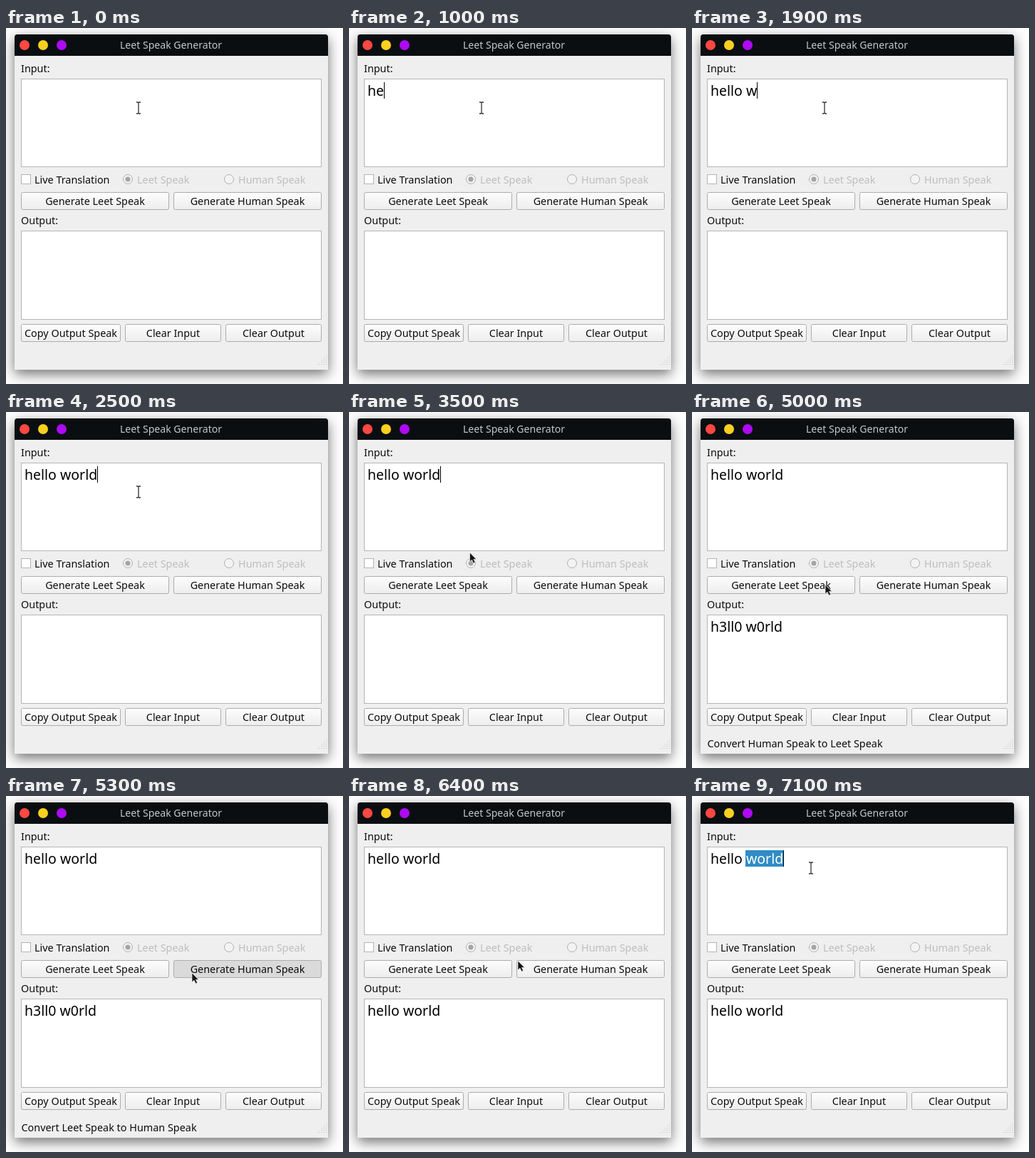
These frames come from a looping animation (473x499 px, 8000 ms). An HTML page:

```html
<!DOCTYPE html>
<html lang="en">
<head>
<meta charset="utf-8">
<title>Leet Speak Generator</title>
<style>
  html, body { margin: 0; width: 100%; height: 100%; overflow: hidden; background: #fdfdfd; }
  svg { display: block; width: 473px; height: 499px; }
  text { font: 14.4px "Noto Sans", "Open Sans", sans-serif; white-space: pre; fill: #0c0c0c; }
  .big { font-size: 19.5px; fill: #000; }
  .off { fill: #bebebe; }
  .mid { text-anchor: middle; }
  .field { fill: #fff; stroke: #b5b5b5; }
  .button { fill: url(#face); stroke: #adadad; }
  .button.down { fill: #dadada; }
</style>
</head>
<body>
<svg id="stage" viewBox="0 0 473 499" xmlns="http://www.w3.org/2000/svg">
  <defs>
    <linearGradient id="face" x2="0" y2="1">
      <stop stop-color="#fdfdfd"/><stop offset="1" stop-color="#ededed"/>
    </linearGradient>
    <filter id="blur" x="-20%" y="-20%" width="140%" height="140%">
      <feGaussianBlur stdDeviation="9"/>
    </filter>
  </defs>
  <rect width="473" height="499" fill="#fdfdfd"/>
  <rect x="12" y="15" width="440" height="470" fill="#000" opacity=".55" filter="url(#blur)"/>
  <path d="M12 479V13q0-4 4-4H448q4 0 4 4V479z" fill="#efefef"/>
  <path d="M12 39V13q0-4 4-4H448q4 0 4 4V39z" fill="#0a0e11"/>
  <circle cx="26" cy="24" r="7" fill="#ff4843"/>
  <circle cx="52" cy="24" r="7" fill="#fdd01f"/>
  <circle cx="78" cy="24" r="7" fill="#ae0af5"/>
  <text class="mid" x="231.5" y="28.5" style="font-size:14.1px;fill:#c3c7ca">Leet Speak Generator</text>
  <text x="21" y="62">Input:</text>
  <rect class="field" x="21.5" y="71.5" width="421" height="123"/>
  <rect class="field" x="21.5" y="205.5" width="13" height="13"/>
  <text x="40" y="218">Live Translation</text>
  <g fill="#f3f3f3" stroke="#b0b0b0">
    <circle cx="171" cy="212" r="6.5"/>
    <circle cx="313" cy="212" r="6.5"/>
  </g>
  <circle cx="171" cy="212" r="3.5" fill="#a5a5a5"/>
  <text class="off" x="184" y="218">Leet Speak</text>
  <text class="off" x="326" y="218">Human Speak</text>
  <text x="21" y="275">Output:</text>
  <rect class="field" x="21.5" y="284.5" width="421" height="124"/>
  <g id="buttons"></g>
  <g id="grip" fill="#bdbdbd"></g>
  <rect id="mark" y="76" height="23" fill="#308cc6"/>
  <text class="big" x="26" y="95"><tspan id="head"></tspan><tspan id="tail"></tspan></text>
  <rect id="caret" y="76" width="1" height="23" fill="#000"/>
  <text class="big" id="output" x="26" y="308"></text>
  <text id="status" x="21.5" y="470"></text>
  <g id="beam" fill="none">
    <path d="M-3-8H-1L0-7 1-8H3M0-7V7M-3 8H-1L0 7 1 8H3" stroke="#fff" stroke-width="2.6" opacity=".7"/>
    <path d="M-3-8H-1L0-7 1-8H3M0-7V7M-3 8H-1L0 7 1 8H3" stroke="#333" stroke-width="1.3"/>
  </g>
  <path id="arrow" d="M0 0V13L3 10.3 5.2 15 7.6 13.8 5.5 9.4H9.3z" fill="#151515" stroke="#eee" stroke-width=".7"/>
</svg>
<script>
const $ = id => document.getElementById(id);
const NS = "http://www.w3.org/2000/svg";
const LOOP = 8000, LEFT = 26;
const phrase = "hello world";
const leet = s => s.replace(/e/g, "3").replace(/o/g, "0");

function add(parent, tag, attrs, text = "") {
  const el = document.createElementNS(NS, tag);
  for (const key in attrs) el.setAttribute(key, attrs[key]);
  el.textContent = text;
  return parent.appendChild(el);
}

function addButton(x, y, w, label) {
  const face = add($("buttons"), "rect", { class: "button", x: x + .5, y: y + .5, width: w - 1, height: 24, rx: 2 });
  add($("buttons"), "text", { class: "mid", x: x + w / 2, y: y + 18 }, label);
  return face;
}

const toLeet = addButton(21, 230, 208, "Generate Leet Speak");
const toHuman = addButton(235, 230, 208, "Generate Human Speak");
addButton(21, 415, 140, "Copy Output Speak");
addButton(167, 415, 135, "Clear Input");
addButton(308, 415, 135, "Clear Output");

for (let row = 0; row < 5; row++)
  for (let col = 4 - row; col < 5; col++)
    add($("grip"), "rect", { x: 437 + col * 3, y: 459 + row * 3, width: 1, height: 1 });

const keyTimes = [500, 1000, 1100, 1200, 1400, 1500, 1900, 2100, 2200, 2400, 2500];

// Pointer stops: time, x, y, arrow?
const stops = [
  [0, 186, 112, 0], [3300, 184, 124, 0], [3400, 176, 163, 0], [3500, 169.5, 197, 1], [3600, 175, 238, 1],
  [5000, 187, 242, 1], [5100, 216, 249, 1], [5200, 250, 250, 1], [5300, 261, 248, 1],
  [6400, 237, 231, 1], [6500, 211, 178, 0], [6600, 179, 119, 0], [6700, 167, 101, 0]
];

const within = (t, a, b) => t >= a && t < b;

function statusAt(t) {
  if (within(t, 3600, 5200)) return "Convert Human Speak to Leet Speak";
  if (within(t, 5200, 6400)) return "Convert Leet Speak to Human Speak";
  return "";
}

function draw(t) {
  const typed = phrase.slice(0, keyTimes.filter(k => k <= t).length);
  const selected = t >= 7100;
  $("head").textContent = typed.slice(0, 6);
  $("tail").textContent = typed.slice(6);
  $("tail").style.fill = selected ? "#fff" : "#000";

  const headEnd = LEFT + (typed ? $("head").getComputedTextLength() : 0);
  const end = Math.round(headEnd + (typed.length > 6 ? $("tail").getComputedTextLength() : 0));
  const caretOn = within(t, 400, 900) || within(t, 1000, 2900) || within(t, 3400, 3800) || t >= 6900;
  $("caret").setAttribute("x", end);
  $("caret").style.display = caretOn ? "" : "none";

  const markX = Math.round(headEnd) - 1;
  $("mark").setAttribute("x", markX);
  $("mark").setAttribute("width", selected ? end - markX : 0);

  $("output").textContent = t < 4100 ? "" : t < 5500 ? leet(phrase) : phrase;
  $("status").textContent = statusAt(t);
  toLeet.classList.toggle("down", within(t, 3800, 4100));
  toHuman.classList.toggle("down", within(t, 5300, 5500));

  const [, x, y, isArrow] = stops.filter(s => s[0] <= t).pop();
  for (const [id, on] of [["arrow", isArrow], ["beam", !isArrow]]) {
    $(id).setAttribute("transform", `translate(${x} ${y})`);
    $(id).style.display = on ? "" : "none";
  }
}

const start = performance.now();
function tick() {
  draw((performance.now() - start) % LOOP);
  requestAnimationFrame(tick);
}
tick();
</script>
</body>
</html>
```
